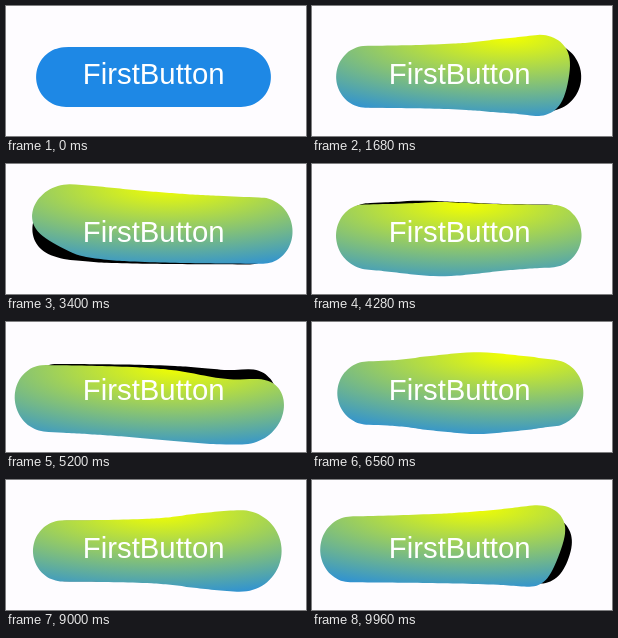
Animation, 300 px wide and 130 px high, one loop 10000 ms. Source, as an HTML page:

```html
<!DOCTYPE html>
<html lang="en">
<head>
<meta charset="utf-8">
<title>Liquid button</title>
<style>
html, body { margin: 0; width: 100%; height: 100%; overflow: hidden; background: #fefcff; }
svg { display: block; width: 100%; height: 100%; }
text { font: 29.3px "Liberation Sans", Arial, sans-serif; fill: #fff; text-anchor: middle; }
</style>
</head>
<body>
<svg viewBox="0 0 300 130">
  <defs>
    <radialGradient id="glow" gradientUnits="userSpaceOnUse" cx="0" cy="0" r="1">
      <stop offset="0" stop-color="#f2ff00"/>
      <stop offset="1" stop-color="#1e88e5"/>
    </radialGradient>
  </defs>
  <path id="back" fill="#000"/>
  <path id="front"/>
  <text x="147.7" y="78">FirstButton</text>
</svg>
<script>
const LOOP = 10000, STEP = 40, HOVER = 600, RAMP = 300;
const LAG = 120, BACK_FORCE = 0.42, SOFT = 14;
const LEFT = 30, RIGHT = 265, CY = 71, R = 30;
const back = document.getElementById('back');
const front = document.getElementById('front');
const glow = document.getElementById('glow');

// Pointer route: time, x, y
const route = [
  [600, 283, 85], [1000, 285, 80], [1500, 230, 75], [1680, 272, 78],
  [2100, 215, 20], [2600, 150, 75], [2900, 120, 118], [3400, 38, 112],
  [4000, 100, 80], [4500, 150, 20], [5200, 231, 25], [6000, 200, 64],
  [6560, 165, 70], [7300, 75, 71], [8080, 95, 70], [8500, 225, 71],
  [9200, 240, 72], [9600, 278, 85], [9960, 280, 88]
];

const clamp = v => Math.max(0, Math.min(1, v));
const mix = (a, b, u) => a + (b - a) * u;
const outline = makePill();

function makePill() {
  const gap = 5, pts = [];
  const arc = (cx, from) => {
    for (let i = 0; i <= 20; i++) {
      const a = from + Math.PI * i / 20;
      pts.push([cx + R * Math.cos(a), CY + R * Math.sin(a)]);
    }
  };
  for (let x = LEFT + R + gap; x < RIGHT - R; x += gap) pts.push([x, CY - R]);
  arc(RIGHT - R, -Math.PI / 2);
  for (let x = RIGHT - R - gap; x > LEFT + R; x -= gap) pts.push([x, CY + R]);
  arc(LEFT + R, Math.PI / 2);
  return pts;
}

function pointerAt(t) {
  const i = Math.max(1, route.findIndex(k => k[0] >= t));
  const [t0, x0, y0] = route[i - 1], [t1, x1, y1] = route[i];
  const u = clamp((t - t0) / (t1 - t0)), e = u * u * (3 - 2 * u);
  return [mix(x0, x1, e), mix(y0, y1, e)];
}

// Pushes the outline away from the pointer, harder once it leaves the pill
function repel([x, y], force) {
  const axisX = Math.max(LEFT + R, Math.min(RIGHT - R, x));
  const away = clamp((Math.hypot(x - axisX, y - CY) - R) / 14);
  const limit = mix(12, 22, away) * force;
  const reach = mix(650, 5500, away ** 3) * force;
  return outline.map(([px, py]) => {
    const dx = px - x, dy = py - y;
    const d = Math.hypot(dx, dy) || 1e-6;
    const f = Math.min(limit, reach / d) / Math.hypot(d, SOFT);
    return [px + dx * f, py + dy * f];
  });
}

function smoothPath(pts) {
  const mid = (p, q) => ((p[0] + q[0]) / 2).toFixed(2) + ' ' + ((p[1] + q[1]) / 2).toFixed(2);
  const n = pts.length;
  let d = 'M' + mid(pts[n - 1], pts[0]);
  pts.forEach((p, i) => {
    d += `Q${p[0].toFixed(2)} ${p[1].toFixed(2)} ${mid(p, pts[(i + 1) % n])}`;
  });
  return d + 'Z';
}

function render(time) {
  const t = Math.floor((time % LOOP) / STEP) * STEP;
  if (t < HOVER) {
    back.setAttribute('d', '');
    front.setAttribute('d', smoothPath(outline));
    front.setAttribute('fill', '#1e88e5');
    return;
  }
  const ramp = clamp((t - HOVER) / RAMP);
  const pts = repel(pointerAt(t), ramp);
  const top = Math.min(...pts.map(p => p[1]));
  const glowX = 175 + 22 * Math.cos(2 * Math.PI * (t - 1650) / 5000);
  front.setAttribute('d', smoothPath(pts));
  front.setAttribute('fill', 'url(#glow)');
  back.setAttribute('d', smoothPath(repel(pointerAt(t - LAG), ramp * BACK_FORCE)));
  glow.setAttribute('gradientTransform', `translate(${glowX} ${top + 3}) scale(315 90)`);
}

const start = performance.now();
function tick() {
  render(performance.now() - start);
  requestAnimationFrame(tick);
}
tick();
</script>
</body>
</html>
```
